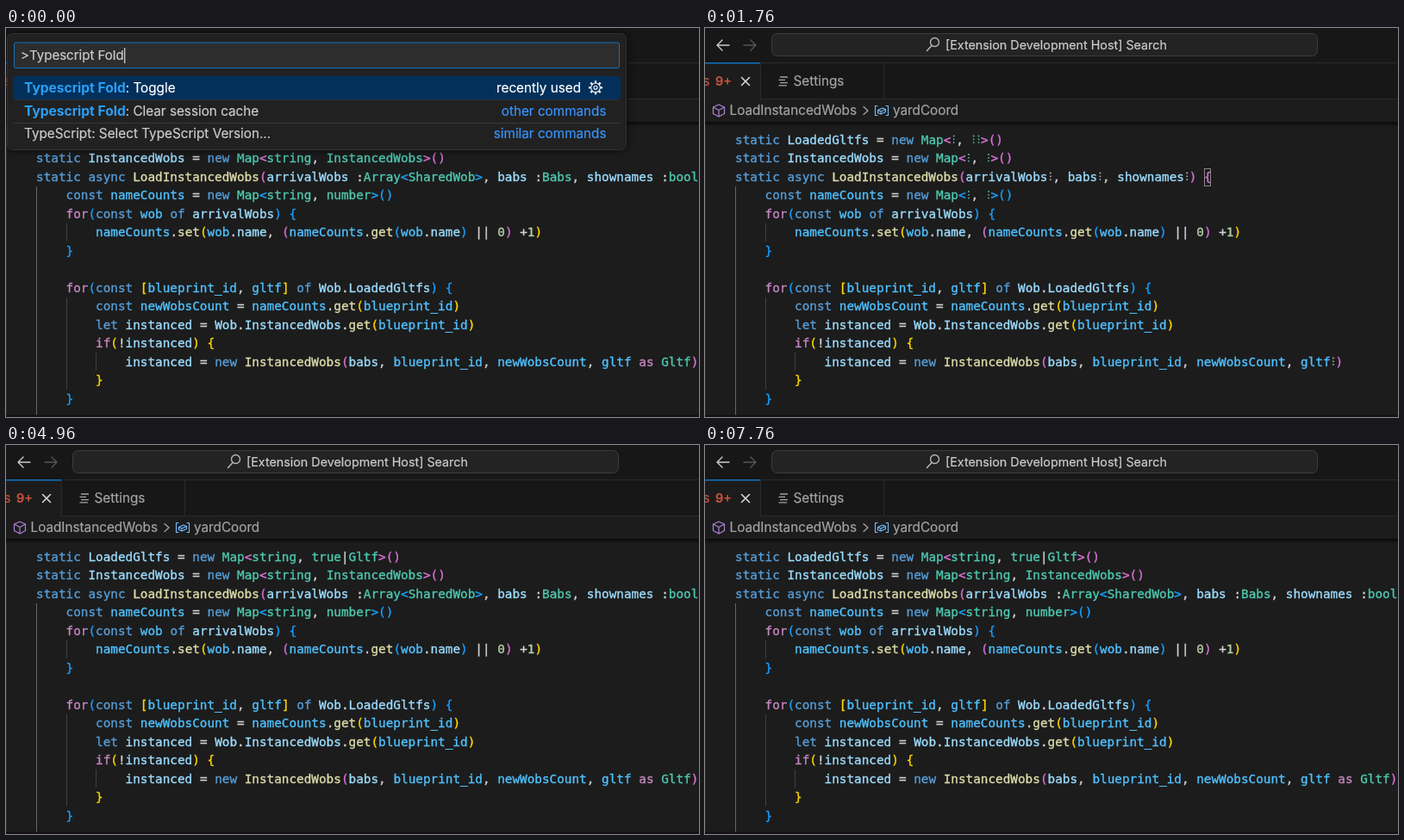
Recreate the animation shown at these times as an HTML page. Size 804x452 px, loop 7.92 s.

```html
<!DOCTYPE html>
<html lang="en">
<head>
<meta charset="utf-8">
<title>Fold toggle</title>
<style>
  html, body { margin: 0; width: 100%; height: 100%; overflow: hidden; background: #1c1c1c; }
  svg { display: block; width: 804px; height: 452px; }
  text { white-space: pre; fill: currentColor; stroke: currentColor; stroke-width: .2; }
  tspan { fill: currentColor; stroke: currentColor; }
  .ui text { font: 15.28px Inter, sans-serif; color: #ccc; }
  .ui .hit { font-weight: 700; font-size: 15.55px; color: #2a9ff8; stroke-width: 0; }
  .ui .link { color: #3794ff; text-anchor: end; }
  .ui .on { color: #fff; }
  .ui .dim { color: #a4a4a4; }
  .ui .key { font: 13px Inter, "DejaVu Sans", sans-serif; text-anchor: middle; }
  .code text { font: 14.34px "DejaVu Sans Mono", monospace; stroke-width: .35; }
  .line { fill: none; stroke-linecap: round; stroke-linejoin: round; }
  #palette { filter: drop-shadow(0 1px 5px rgba(0, 0, 0, .6)); }
</style>
</head>
<body>
<svg viewBox="0 0 804 452">
  <defs>
    <linearGradient id="shade" x1="0" y1="0" x2="0" y2="1">
      <stop offset="0" stop-color="#0a0a0a"/>
      <stop offset="1" stop-color="#0a0a0a" stop-opacity="0"/>
    </linearGradient>
  </defs>
  <rect width="804" height="452" fill="#1c1c1c"/>

  <g class="code">
    <path d="M35.5 184V450" stroke="#666"/>
    <path d="M70.5 227V248M70.5 313V420M104.5 377V398" stroke="#404040"/>
    <g id="both"></g>
    <g id="open"></g>
    <g id="folded">
      <rect x="579.5" y="163.5" width="7" height="20" fill="none" stroke="#888"/>
    </g>
  </g>
  <path d="M.5 110V450" stroke="#2b2b2b"/>
  <rect y="449.5" width="804" height="3" fill="#161012"/>

  <g class="ui">
    <rect width="804" height="40" fill="#171717"/>
    <rect x="64" y="40" width="740" height="42" fill="#171717"/>
    <path d="M64 40.5H804M64 82.5H804M64.5 41V82M207.5 41V82" stroke="#2a2a2a"/>
    <rect y="40" width="64" height="1.5" fill="#0c72c4"/>
    <rect y="109" width="804" height="6" fill="url(#shade)"/>

    <path class="line" d="M28 20H14M20 14L14 20L20 26" stroke="#ccc" stroke-width="1.4"/>
    <path class="line" d="M45 20H59M53 14L59 20L53 26" stroke="#575757" stroke-width="1.4"/>
    <rect x="77.5" y="6.5" width="633" height="26" rx="6" fill="#232323" stroke="#3d3d3d"/>
    <circle cx="266.5" cy="16.5" r="5" fill="none" stroke="#bbb" stroke-width="1.3"/>
    <path class="line" d="M263 20.5L257.5 26.5" stroke="#bbb" stroke-width="1.4"/>
    <text x="279" y="25" style="font-size:14.32px">[Extension Development Host] Search</text>

    <text x="-2.5" y="67" style="color:#c9533c">s</text>
    <text x="12" y="67" style="color:#c9533c;font-weight:600;font-size:14.5px">9+</text>
    <path class="line" d="M42.5 57.5L51.5 66.5M51.5 57.5L42.5 66.5" stroke="#ddd" stroke-width="1.5"/>
    <path d="M87 57H96M85.5 60.3H93M87 63.6H96M85.5 66.9H95" stroke="#a4a4a4" stroke-width="1.3"/>
    <text class="dim" x="102.5" y="67">Settings</text>

    <path class="line" d="M16 89L22.5 92V99.5L16 103L9.5 99.5V92ZM9.5 92L16 95.5L22.5 92M16 95.5V103" stroke="#b180d7" stroke-width="1.2"/>
    <text class="dim" x="28.5" y="101">LoadInstancedWobs</text>
    <path class="line" d="M184 91.5L189 96L184 100.5" stroke="#a4a4a4" stroke-width="1.3"/>
    <path class="line" d="M200 90.5H197.5V101.5H200M210 90.5H212.5V101.5H210M200.5 95.5L206 93L209.5 94.5V97.5L204 100L200.5 98.5ZM200.5 95.5L204 97L209.5 94.5M204 97V100" stroke="#75beff" stroke-width="1.1"/>
    <text class="dim" x="218" y="101">yardCoord</text>
  </g>

  <g id="palette" class="ui">
    <rect id="panel" x="1.5" y="6.5" width="718" height="135" rx="6" fill="#212121" stroke="#303030"/>
    <rect x="9.5" y="17" width="702" height="29.5" rx="2" fill="#2d2d2d" stroke="#1273bf"/>
    <text id="query" x="17" y="37" style="font-size:15.05px"></text>
    <path id="caret" d="M.5 23V41" stroke="#ddd" stroke-width="1.2"/>
    <rect x="8.5" y="56" width="704.5" height="27" rx="3" fill="#03305a"/>
    <path d="M9 83.5H712" stroke="#303030"/>
    <text class="on" x="21" y="74.5"><tspan class="hit">Typescript Fold</tspan>: <tspan id="hit" class="hit"></tspan><tspan id="rest"></tspan></text>
    <text class="on" x="569" y="74.5">recently used</text>
    <circle cx="684" cy="69.3" r="5.3" fill="none" stroke="#fff" stroke-width="1.1"/>
    <circle cx="684" cy="69.3" r="2" fill="none" stroke="#fff" stroke-width="1.1"/>
    <g id="teeth"></g>

    <g id="before">
      <path d="M9 110.5H712" stroke="#3a3a3a"/>
      <text x="21" y="101.7"><tspan class="hit">Typescript Fold</tspan>: Clear session cache</text>
      <text class="link" x="696.5" y="101.7">other commands</text>
      <text x="21" y="128">TypeScript: Select TypeScript Version...</text>
      <text class="link" x="696.5" y="128">similar commands</text>
    </g>
    <g id="after">
      <text x="21" y="101.7">TypeScript: Select TypeScript Version...</text>
      <text class="link" x="696.5" y="101.7">similar commands</text>
      <text x="21" y="127.2">Typescript Fold: Clear session cache</text>
    </g>
    <g id="extra">
      <text x="21" y="153.2">Toggle Fold</text>
    </g>
  </g>
</svg>
<script>
const $ = id => document.getElementById(id);
const LOOP = 7920, CELL = 8.633, DOT = 5.8;
const KEYSTROKES = ' Toggle', TYPE_START = 160, TYPE_STEP = 110;
const CLOSE = 1360;
const FOLD_TIMES = [1440, 4560, 5200, 5920];

function add(parent, tag, attrs, text) {
  const el = document.createElementNS('http://www.w3.org/2000/svg', tag);
  for (const k in attrs) el.setAttribute(k, attrs[k]);
  if (text) el.textContent = text;
  parent.appendChild(el);
  return el;
}

// "~x" switches the colour; "~." and "~:" draw a folded marker.
const COLORS = {
  k: '#569cd6', c: '#c586c0', v: '#9cdcfe', r: '#4fc1ff', t: '#4ec9b0',
  f: '#dcdcaa', n: '#b5cea8', p: '#d0d0d0', 1: '#ffd700', 2: '#da70d6', 3: '#179fff'
};

function drawLine(parent, row, col, source) {
  const y = 134.5 + row * 21.5;
  let x = 35 + col * CELL;
  for (const part of source.split('~').slice(1)) {
    const kind = part[0], text = part.slice(1);
    if (kind === '.' || kind === ':') {
      for (const dy of [-9, -5.2, -1.4])
        add(parent, 'circle', { cx: x + DOT / 2 + .4, cy: y + dy, r: .9, fill: kind === '.' ? '#4ec9b0' : '#b8c4c4' });
      x += DOT;
    } else {
      add(parent, 'text', { x, y, color: COLORS[kind] }, text);
      x += text.length * CELL;
    }
  }
}

const gltfs = '~kstatic ~vLoadedGltfs~p = ~knew ~tMap~2<';
const wobs = '~kstatic ~vInstancedWobs~p = ~knew ~tMap~2<';
const load = '~kstatic async ~fLoadInstancedWobs~2(~varrivalWobs';
const counts = '~kconst ~rnameCounts~p = ~knew ~tMap~3<';
const make = '~vinstanced~p = ~knew ~fInstancedWobs~2(~vbabs~p, ~rblueprint_id~p, ~rnewWobsCount~p, ~rgltf';

[
  [0, 0, gltfs + '~tstring~p, ~ttrue~p|~tGltf~2>()'],
  [1, 0, wobs + '~tstring~p, ~tInstancedWobs~2>()'],
  [2, 0, load + '~p :~tArray~3<~tSharedWob~3>~p, ~vbabs~p :~tBabs~p, ~vshownames~p :~tbool'],
  [3, 4, counts + '~tstring~p, ~tnumber~3>()'],
  [12, 12, make + '~c as ~tGltf~2)']
].forEach(l => drawLine($('open'), ...l));

[
  [0, 0, gltfs + '~.~p, ~.~.~2>()'],
  [1, 0, wobs + '~.~p, ~.~2>()'],
  [2, 0, load + '~:~p, ~vbabs~:~p, ~vshownames~:~2) {'],
  [3, 4, counts + '~.~p, ~.~3>()'],
  [12, 12, make + '~:~2)']
].forEach(l => drawLine($('folded'), ...l));

[
  [4, 4, '~cfor~3(~kconst ~rwob~k of ~varrivalWobs~3) {'],
  [5, 8, '~rnameCounts~p.~fset~1(~rwob~p.~vname~p, ~2(~rnameCounts~p.~fget~3(~rwob~p.~vname~3)~p || ~n0~2)~p +~n1~1)'],
  [6, 4, '~3}'],
  [8, 4, '~cfor~3(~kconst ~1[~rblueprint_id~p, ~rgltf~1]~k of ~vWob~p.~vLoadedGltfs~3) {'],
  [9, 8, '~kconst ~rnewWobsCount~p = ~rnameCounts~p.~fget~1(~rblueprint_id~1)'],
  [10, 8, '~klet ~vinstanced~p = ~vWob~p.~vInstancedWobs~p.~fget~1(~rblueprint_id~1)'],
  [11, 8, '~cif~1(~p!~vinstanced~1) {'],
  [13, 8, '~1}'],
  [14, 4, '~3}']
].forEach(l => drawLine($('both'), ...l));

for (let i = 0; i < 8; i++)
  add($('teeth'), 'rect', {
    x: 682.9, y: 61.3, width: 2.2, height: 2.6, fill: '#fff',
    transform: `rotate(${i * 45} 684 69.3)`
  });

[['⌘', 586.5, 26], ['K', 616, 23], ['⌘', 652, 26], ['L', 681, 22]].forEach(([label, x, w]) => {
  add($('extra'), 'rect', { x: x - w / 2, y: 138.5, width: w, height: 21, rx: 3, fill: '#2c2c2c', stroke: '#353535' });
  add($('extra'), 'text', { x, y: 153.2, class: 'key' }, label);
});

const show = (id, on) => $(id).style.display = on ? '' : 'none';

function render(t) {
  const folded = FOLD_TIMES.filter(s => t >= s).length % 2 === 1;
  show('folded', folded);
  show('open', !folded);

  show('palette', t < CLOSE);
  if (t >= CLOSE) return;
  const n = Math.max(0, Math.min(KEYSTROKES.length, Math.floor((t - TYPE_START) / TYPE_STEP) + 1));
  const done = n === KEYSTROKES.length;
  $('query').textContent = '>Typescript Fold' + KEYSTROKES.slice(0, n);
  const end = 17 + $('query').getComputedTextLength() + .5;
  $('caret').setAttribute('transform', `translate(${end} 0)`);
  $('hit').textContent = KEYSTROKES.slice(1, Math.max(1, n));
  $('rest').textContent = KEYSTROKES.slice(Math.max(1, n));
  $('panel').setAttribute('height', done ? 161 : 135);
  show('before', n < 2);
  show('after', n >= 2);
  show('extra', done);
}

const start = performance.now();
function tick() {
  render((performance.now() - start) % LOOP);
  requestAnimationFrame(tick);
}
tick();
</script>
</body>
</html>
```
